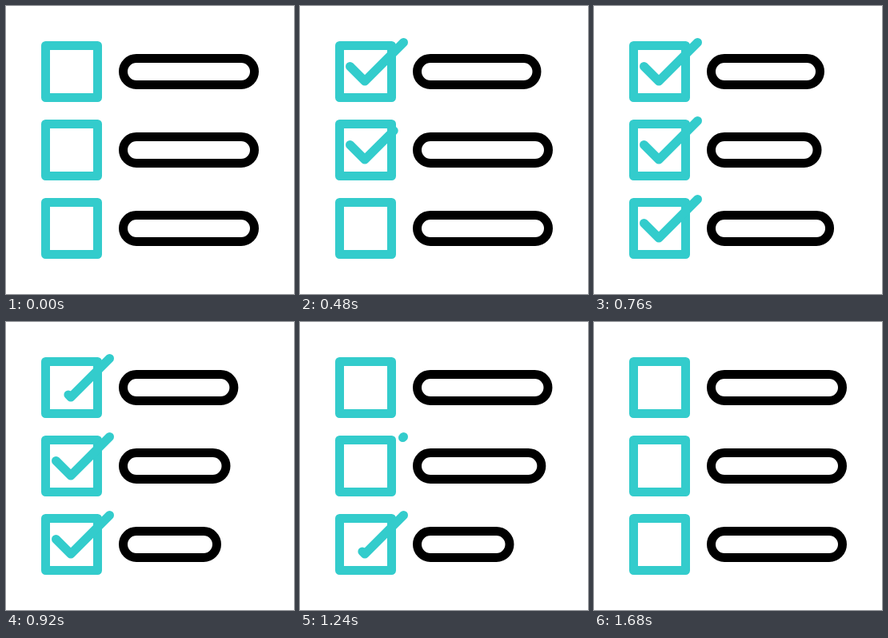
An HTML page for the animation above (2000 ms loop, 360 by 360 pixels).

```html
<!DOCTYPE html>
<html lang="en">
<head>
<meta charset="utf-8">
<title>Checklist</title>
<style>
  html, body { margin: 0; height: 100%; overflow: hidden; background: #fff; }
  svg { display: block; width: 100vw; height: 100vh; }

  svg * {
    fill: none;
    stroke-width: 11;
    stroke-linecap: round;
    stroke-linejoin: round;
  }
  .box, .tick { stroke: #3cc; }
  .bar { stroke: #000; width: 164px; }
  .tick { stroke-dasharray: 1 3; stroke-dashoffset: 1; opacity: 0; }

  .row {
    --smooth: cubic-bezier(.3333, 0, .6667, 1);
    --out: cubic-bezier(.3333, .6667, .6667, 1);
  }
  .row:nth-child(1) { --shrink: 28px; --delay: 0ms; }
  .row:nth-child(2) { --shrink: 35.5px; --delay: 160ms; }
  .row:nth-child(3) { --shrink: 53px; --delay: 320ms; }

  .tick { animation: tick 2s linear var(--delay) infinite; }
  .bar { animation: bar 2s linear var(--delay) infinite; }

  /* The tick is drawn, held, then erased from its tail. */
  @keyframes tick {
    0%, 10% { stroke-dashoffset: 1; animation-timing-function: var(--out); }
    21.75% { stroke-dashoffset: 0; }
    44% { stroke-dashoffset: 0; animation-timing-function: var(--smooth); }
    56%, 100% { stroke-dashoffset: -1; }
    0%, 10% { opacity: 0; }
    10.01%, 55.99% { opacity: 1; }
    56%, 100% { opacity: 0; }
  }
  @keyframes bar {
    0%, 18% { width: 164px; animation-timing-function: var(--smooth); }
    38% { width: calc(164px - var(--shrink)); }
    44% { width: calc(164px - var(--shrink)); animation-timing-function: var(--smooth); }
    66%, 100% { width: 164px; }
  }
</style>
</head>
<body>
<svg viewBox="0 0 360 360">
  <g class="row">
    <rect class="box" x="49.5" y="49.5" width="65" height="65"/>
    <path class="tick" pathLength="1" d="M62.5 75.5 81 94 129.5 45.5"/>
    <rect class="bar" x="146.5" y="65.5" height="33" rx="16.5"/>
  </g>
  <g class="row" transform="translate(0 98)">
    <rect class="box" x="49.5" y="49.5" width="65" height="65"/>
    <path class="tick" pathLength="1" d="M62.5 75.5 81 94 129.5 45.5"/>
    <rect class="bar" x="146.5" y="65.5" height="33" rx="16.5"/>
  </g>
  <g class="row" transform="translate(0 196)">
    <rect class="box" x="49.5" y="49.5" width="65" height="65"/>
    <path class="tick" pathLength="1" d="M62.5 75.5 81 94 129.5 45.5"/>
    <rect class="bar" x="146.5" y="65.5" height="33" rx="16.5"/>
  </g>
</svg>
</body>
</html>
```
